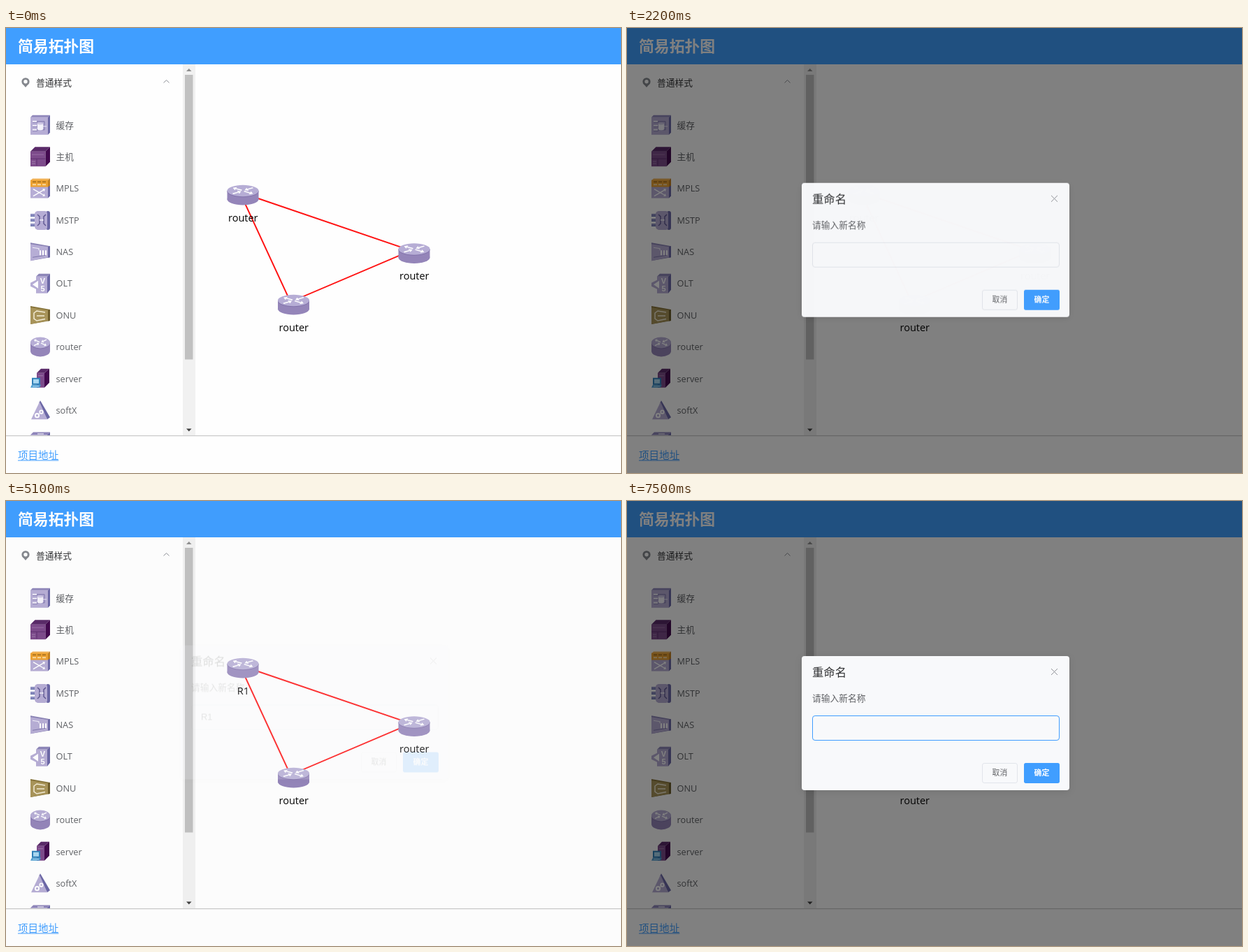
Recreate the animation shown at these times as an HTML page with a canvas. Size 880 by 637 pixels, loop 8000 ms.

```html
<!DOCTYPE html>
<html lang="zh">
<head>
<meta charset="utf-8">
<style>
html, body { margin: 0; width: 100%; height: 100%; overflow: hidden; background: #fefefe; }
canvas { display: block; }
</style>
</head>
<body>
<canvas id="stage" width="880" height="637"></canvas>
<script>
const W = 880, H = 637, LOOP = 8000, STEP = 100;
const stage = document.getElementById('stage').getContext('2d');
const layer = document.createElement('canvas');
layer.width = W;
layer.height = H;
const dialogCtx = layer.getContext('2d');
let c = stage;

const SANS = '"Open Sans", "Noto Sans CJK SC", "Noto Sans CJK", sans-serif';
const ARIAL = '"Liberation Sans", Arial, sans-serif';
const BLUE = '#409eff', LILAC = '#b6add5', VIOLET = '#9485b9', DUSK = '#6c68a6', INK = '#606266';
const PANEL = '#f8f9fb', BORDER = '#e2e5eb';

// Drawing helpers
function rect(color, x, y, w, h) {
  c.fillStyle = color;
  c.fillRect(x, y, w, h);
}
function trace(pts) {
  c.beginPath();
  for (let i = 0; i < pts.length; i += 2) c.lineTo(pts[i], pts[i + 1]);
}
function poly(color, ...pts) {
  trace(pts);
  c.fillStyle = color;
  c.fill();
}
function line(color, width, ...pts) {
  trace(pts);
  c.strokeStyle = color;
  c.lineWidth = width;
  c.stroke();
}
function oval(color, x, y, rx, ry = rx) {
  c.beginPath();
  c.ellipse(x, y, rx, ry, 0, 0, 7);
  c.fillStyle = color;
  c.fill();
}
function ring(color, width, x, y, r) {
  c.beginPath();
  c.arc(x, y, r, 0, 7);
  c.strokeStyle = color;
  c.lineWidth = width;
  c.stroke();
}
function box(fill, border, x, y, w, h, r) {
  c.beginPath();
  c.roundRect(x, y, w, h, r);
  c.fillStyle = fill;
  c.fill();
  if (border) {
    c.strokeStyle = border;
    c.lineWidth = 1;
    c.stroke();
  }
}
function text(s, x, y, size, color, opt = {}) {
  c.font = `${opt.weight || 400} ${size}px ${opt.family || SANS}`;
  c.textAlign = opt.align || 'left';
  c.fillStyle = color;
  c.fillText(s, x, y);
}
function arrow(color, x1, y1, x2, y2, size = 3) {
  const a = Math.atan2(y2 - y1, x2 - x1), u = Math.cos(a) * size, v = Math.sin(a) * size;
  line(color, 1.4, x1, y1, x2 - u, y2 - v);
  poly(color, x2, y2, x2 - u - v * 0.8, y2 - v + u * 0.8, x2 - u + v * 0.8, y2 - v - u * 0.8);
}
function cross(color, cx, cy, w, h) {
  for (const s of [-1, 1]) {
    arrow(color, cx - w, cy - h * s, cx + w, cy + h * s);
  }
}
function slab(front, top, side, d = 3) {
  poly(front, 0, d, 28 - d, d, 28 - d, 28, 0, 28);
  poly(top, 0, d, d, 0, 28, 0, 28 - d, d);
  poly(side, 28 - d, d, 28, 0, 28, 28 - d, 28 - d, 28);
}

// Icons live in a 28 x 28 box
const icons = {
  cache() {
    slab(LILAC, '#8f86ba', DUSK);
    for (const y of [9, 15, 21]) {
      rect('#f4f2fa', 3, y - 1, 6, 2);
      line('#7d74aa', 0.8, 3, y + 1.5, 10, y + 1.5);
    }
    line('#7d74aa', 1, 9, 9, 20, 9, 20, 21, 9, 21);
    rect('#f4f2fa', 10, 12, 8, 8);
    oval('#f4f2fa', 14, 20, 4, 1.6);
    oval('#cfc8e4', 14, 12, 4, 1.6);
    line('#e9e6f4', 1, 18, 16, 23, 16);
  },
  host() {
    slab('#7d4b8b', '#5a2a69', '#43094f', 6.5);
    line('#5e2f70', 1, 0, 17, 21.5, 17);
    line('#9f78aa', 0.8, 2, 11, 19, 11);
    line('#5e2f70', 1, 9, 17, 9, 27);
    line('#a98ab4', 0.8, 2, 21, 7, 21);
    line('#a98ab4', 0.8, 2, 24, 7, 24);
  },
  mpls() {
    slab(LILAC, '#f2b45a', DUSK);
    rect('#eda233', 0, 2, 25, 10);
    poly('#c5811f', 25, 3, 28, 0, 28, 10, 25, 12);
    for (const x of [3, 10, 17]) {
      rect('#a06c1e', x, 4, 5, 1.5);
      rect('#fbe3b5', x, 8, 5, 1.5);
    }
    cross('#ffffff', 12.5, 20, 8.5, 5);
  },
  mstp() {
    for (const y of [5, 12, 19]) {
      rect('#8d8fc0', 0, y, 9, 4);
      rect('#5f6aa6', 0, y + 3, 9, 1);
    }
    box(LILAC, null, 6, 1, 18, 27, 5);
    box(DUSK, null, 22, 1, 6, 27, 3);
    box(LILAC, null, 8, 1, 16, 27, 4);
    line('#5d5690', 1.4, 10, 6, 13, 9, 13, 19, 10, 22);
    line('#5d5690', 1.4, 22, 6, 19, 9, 19, 19, 22, 22);
    arrow('#f4f2fa', 13, 14, 19, 14, 2);
  },
  nas() {
    poly('#8a83b4', 0, 1, 28, 6, 28, 22, 0, 27);
    poly(LILAC, 0, 3, 25, 7, 25, 22, 0, 27);
    poly(DUSK, 25, 7, 28, 6, 28, 22, 25, 22.5);
    line('#efedf7', 1.2, 3, 8, 12, 9.5, 12, 12);
    line('#8078ac', 1, 3, 22, 22, 19);
    for (const x of [13, 17, 21]) rect('#ffffff', x, 12, 2, 7);
  },
  olt() {
    poly('#8d86b8', 8, 4, 12, 0, 28, 0, 24, 4);
    poly(DUSK, 24, 4, 28, 0, 28, 23, 24, 28);
    poly(LILAC, 8, 4, 24, 4, 24, 28, 8, 28, 8, 22, 0, 18, 0, 13, 8, 9);
    poly('#ffffff', 3, 15.5, 11, 10, 11, 21);
    const bold = { weight: 700, align: 'center', family: ARIAL };
    text('V', 17.5, 14.5, 11, '#ffffff', bold);
    text('5', 17.5, 25, 11, '#ffffff', bold);
  },
  onu() {
    poly('#857238', 0, 1, 28, 6, 28, 22, 0, 27);
    poly('#a8945a', 0, 3, 25, 7, 25, 22, 0, 27);
    poly('#6e5d2b', 25, 7, 28, 6, 28, 22, 25, 22.5);
    line('#f3ecd6', 1.5, 21, 10, 9, 8, 5, 11, 5, 19, 9, 22, 21, 19.5);
    line('#f3ecd6', 1.5, 9, 15, 20, 15);
  },
  router() {
    oval(VIOLET, 14, 20, 14, 8);
    rect(VIOLET, 0, 8, 28, 12);
    oval('#8172aa', 14, 9, 14, 8);
    oval(LILAC, 14, 8, 14, 8);
    arrow('#ffffff', 13, 7.3, 5, 3.8);
    arrow('#ffffff', 15, 8.7, 23, 12.2);
    arrow('#ffffff', 23, 3.8, 15.5, 7.2);
    arrow('#ffffff', 5, 12.2, 12.5, 8.8);
  },
  server() {
    poly('#7d4b8b', 9, 6, 20, 6, 20, 27, 9, 27);
    poly('#5a2a69', 9, 6, 15, 0, 27, 0, 20, 6);
    poly('#43094f', 20, 6, 27, 0, 27, 20, 20, 27);
    line('#a98ab4', 0.8, 11, 10, 18, 10);
    poly('#2f7fb8', 2, 13, 14, 13, 14, 23, 2, 23);
    rect('#a9d8f2', 4, 15, 8, 6);
    poly('#4a9bd0', 0, 27, 2, 23, 15, 23, 13, 27);
    line('#dceffa', 0.8, 3, 25, 12, 25);
  },
  softx() {
    poly(DUSK, 14, 0, 28, 24, 24, 27, 12, 4);
    poly(LILAC, 13, 2, 24, 27, 1, 27);
    ring('#ffffff', 2, 9.5, 21.5, 2.6);
    ring('#ffffff', 1.8, 15.5, 16.5, 2.2);
    line('#ffffff', 1, 11, 20, 14, 18);
  },
  more() {
    slab(LILAC, '#8f86ba', DUSK, 4);
    rect('#ffffff', 10, 2, 9, 1);
  }
};

function icon(name, x, y, w = 28, h = 28) {
  c.save();
  c.translate(x, y);
  c.scale(w / 28, h / 28);
  icons[name]();
  c.restore();
}

const palette = [
  ['cache', '缓存'], ['host', '主机'], ['mpls', 'MPLS'], ['mstp', 'MSTP'], ['nas', 'NAS'], ['olt', 'OLT'],
  ['onu', 'ONU'], ['router', 'router'], ['server', 'server'], ['softx', 'softX'], ['more', '']
];

function drawSidebar() {
  // pin and section title
  oval('#85888e', 28, 76.8, 5.6);
  poly('#85888e', 23, 79, 33, 79, 28, 85);
  oval('#fefefe', 28, 76.8, 2.7);
  text('普通样式', 43, 82.6, 12.74, '#303133');
  line('#909399', 1, 225.5, 78.5, 229.5, 74.5, 233.5, 78.5);

  c.save();
  c.beginPath();
  c.rect(0, 52, 253, 531);
  c.clip();
  palette.forEach(([name, label], i) => {
    const y = 138.8 + i * 45.37;
    icon(name, 35, y - 14);
    text(label, 71.5, y + 4.8, 12.74, INK);
  });
  c.restore();

  rect('#f1f1f1', 253, 52, 18, 531);
  rect('#c1c1c1', 256, 67, 11.5, 407.5);
  poly('#8f8f8f', 258, 62, 265.5, 62, 261.8, 58);
  poly('#404040', 258, 573.5, 265.5, 573.5, 261.8, 577.5);
}

const nodes = [[339, 239], [584, 322.5], [411.5, 396]];

function drawGraph(firstLabel) {
  const ends = nodes.flatMap(([x, y]) => [x - 4.5, y - 4]);
  line('#ff1212', 1.9, ...ends, ends[0], ends[1]);
  nodes.forEach(([x, y], i) => {
    icon('router', x - 22.5, y - 14.2, 45, 28.6);
    text(i ? 'router' : firstLabel, x + 0.3, y + 37.6, 14.5, '#000', { align: 'center' });
  });
}

function drawPage(firstLabel) {
  rect('#fefefe', 0, 0, W, H);
  rect(BLUE, 0, 0, W, 52);
  text('简易拓扑图', 17, 33.8, 21.84, '#fff', { weight: 700 });
  drawSidebar();
  drawGraph(firstLabel);
  rect('#cccccc', 0, 583, W, 1.3);
  text('项目地址', 17, 617, 14.56, BLUE);
  rect(BLUE, 17, 618.5, 58.3, 1);
}

function drawMenu(x, y, active) {
  c.save();
  c.shadowColor = 'rgba(0,0,0,.25)';
  c.shadowBlur = 3;
  c.shadowOffsetX = c.shadowOffsetY = 1;
  rect('#fefefe', x + 1, y + 1, 120, 113);
  c.restore();
  ['删除', '重命名', '取消'].forEach((label, i) => {
    const top = y + 2 + i * 37;
    if (i === active) rect('#ecf5ff', x + 2, top, 118, 37);
    text(label, x + 16, top + 23.3, 12.74, i === active ? BLUE : INK);
  });
}

function drawDialog({ value, caret, focus, button }) {
  c = dialogCtx;
  c.clearRect(0, 0, W, H);
  c.save();
  c.shadowColor = 'rgba(0,0,0,.1)';
  c.shadowBlur = 11;
  c.shadowOffsetY = 2;
  box(PANEL, null, 250, 222, 383, 192, 4);
  c.restore();
  text('重命名', 265, 251.3, 16.38, '#303133');
  line('#909399', 1, 607, 240, 616, 249);
  line('#909399', 1, 616, 240, 607, 249);
  text('请输入新名称', 265, 287, 12.74, INK);
  box(PANEL, BORDER, 265.5, 307.5, 353, 35, 3.6);
  if (focus > 0) {
    c.globalAlpha = focus;
    box(PANEL, BLUE, 265.5, 307.5, 353, 35, 3.6);
    c.globalAlpha = 1;
  }
  text(value, 279, 329.3, 12.74, INK, { family: ARIAL });
  if (caret) rect('#555', 279 + [0, 9, 17][value.length], 318, 1, 14);
  box(PANEL, BORDER, 508.5, 375.5, 50, 28, 2.7);
  text('取消', 533.5, 393.2, 10.92, INK, { align: 'center' });
  box(button, null, 568, 375, 51, 29, 2.7);
  text('确定', 593.5, 393.2, 10.92, '#fff', { align: 'center', weight: 600 });
  c = stage;
}

const clamp = v => Math.min(1, Math.max(0, v));

// cubic-bezier(.25, .1, .25, 1)
function ease(x) {
  x = clamp(x);
  let lo = 0, hi = 1;
  for (let i = 0; i < 24; i++) {
    const s = (lo + hi) / 2, q = 1 - s;
    if (0.75 * q * s + s * s * s < x) lo = s; else hi = s;
  }
  return 0.3 * (1 - lo) ** 2 * lo + 3 * (1 - lo) * lo * lo + lo ** 3;
}

const OPEN1 = 1950, CLOSE1 = 4933, OPEN2 = 6516;

function shown(t, duration) {
  if (t >= OPEN2) return ease((t - OPEN2) / duration);
  if (t >= CLOSE1) return 1 - ease((t - CLOSE1) / duration);
  return ease((t - OPEN1) / duration);
}

function dialogState(t) {
  if (t >= OPEN2) {
    return { value: '', caret: t >= 7000 && t < 7500, focus: ease((t - 6950) / 200), button: BLUE };
  }
  return {
    value: t < 3500 ? '' : t < 3800 ? 'R' : 'R1',
    caret: t >= 2400 && t < 2900 || t >= 3400 && t < 4200 || t >= 4700 && t < 4800,
    focus: t < CLOSE1 ? ease((t - 2350) / 200) : 1 - ease((t - CLOSE1) / 200),
    button: t < 4800 ? BLUE : t < 4900 ? '#5aabff' : t < 5000 ? '#4295ea' : BLUE
  };
}

function render(t) {
  drawPage(t < CLOSE1 ? 'router' : 'R1');
  if (t >= 600 && t < OPEN1) {
    drawMenu(338, 238, t < 700 ? -1 : t < 1100 ? 0 : t < 1400 ? 1 : t < 1700 ? 2 : 1);
  }
  if (t >= 5800 && t < OPEN2) drawMenu(578, 325, t < 6200 ? 0 : 1);

  rect(`rgba(0,0,0,${0.5 * shown(t, 200)})`, 0, 0, W, H);
  const p = shown(t, 300);
  if (p > 0.001) {
    drawDialog(dialogState(t));
    stage.globalAlpha = p;
    stage.drawImage(layer, 0, -18.2 * (1 - p));
    stage.globalAlpha = 1;
  }
}

let last = -1;
function tick() {
  const t = Math.floor(performance.now() % LOOP / STEP) * STEP;
  if (t !== last) render(last = t);
  requestAnimationFrame(tick);
}
tick();
</script>
</body>
</html>
```
